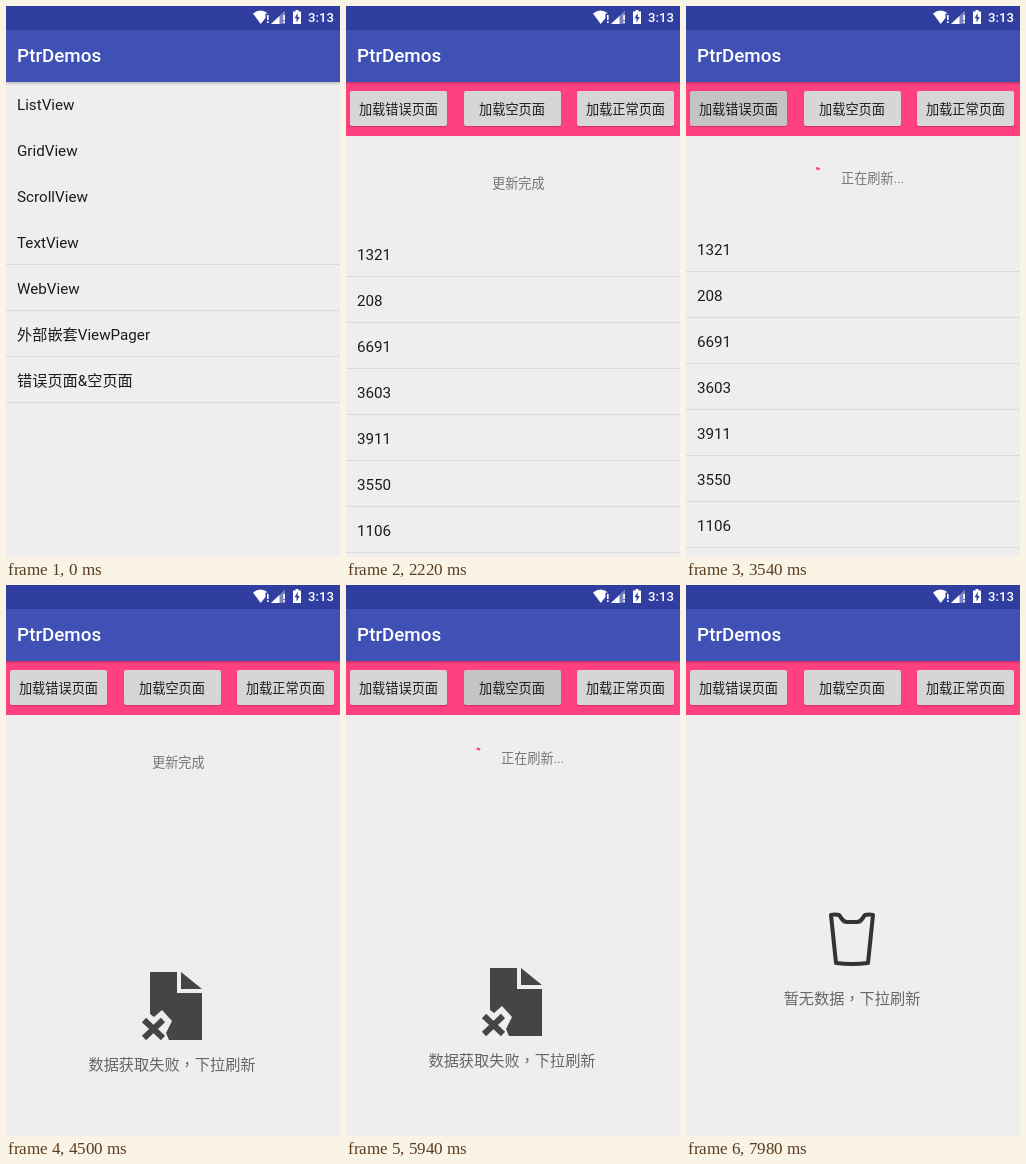
An HTML page that plays this animation: 334 px wide and 551 px high, repeating every 8 s.

```html
<!DOCTYPE html>
<html lang="zh-CN">
<head>
<meta charset="utf-8">
<title>PtrDemos</title>
<style>
  html, body { margin: 0; width: 100%; height: 100%; overflow: hidden; background: #eee; }
  body { font: 15.2px Roboto, "Noto Sans CJK SC", "Noto Sans CJK", sans-serif; color: #1c1c1c; white-space: nowrap; }
  #stage { position: relative; width: 334px; height: 551px; overflow: hidden; }
  #stage div, svg { position: absolute; box-sizing: border-box; }
  svg { overflow: visible; }
  .screen { left: 0; top: 0; width: 334px; height: 551px; background: #eee; isolation: isolate; }
  .status { width: 334px; height: 24px; background: #303f9f; }
  .toolbar { top: 24px; width: 334px; height: 52px; padding-left: 11px; background: #3f51b5; color: #fff;
    font-size: 18.8px; font-weight: 500; line-height: 52px; box-shadow: 0 1px 3px rgba(0,0,0,.3); z-index: 2; }
  .rows { width: 334px; }
  #stage .row { position: relative; height: 46px; padding-left: 11px; line-height: 48px; border-bottom: 1px solid #dadada; }
  #stage .faint { border-color: #ebebeb; }
  #press { left: 4px; top: 352px; width: 327px; height: 44px; background: rgba(0,0,0,.05); }
  #ripple { left: 97px; top: 6px; width: 128px; height: 38px; border-radius: 50%; background: rgba(0,0,0,.025); }
  #bar { top: 75px; width: 334px; height: 55px; background: #ff4081; }
  .button { top: 10px; width: 97px; height: 35px; border-radius: 2px; background: #d6d6d6;
    box-shadow: 0 1px 1px rgba(0,0,0,.2); font-size: 13.2px; line-height: 37px; text-align: center; }
  #view { top: 130px; width: 334px; height: 421px; overflow: hidden; }
  #content { width: 334px; height: 421px; }
  #label { top: -58px; font-size: 13.2px; line-height: 22px; color: #757575; }
  .page { width: 334px; height: 421px; }
  .message { top: 244px; width: 332px; line-height: 22px; text-align: center; color: #666;
    font-family: Roboto, "Noto Sans CJK TC", "Noto Sans CJK", sans-serif; }
</style>
</head>
<body>
<div id="stage">
  <div class="screen">
    <div class="status"></div>
    <div class="toolbar">PtrDemos</div>
    <div class="rows" id="menu" style="top:75px"></div>
    <div id="press"><div id="ripple"></div></div>
  </div>
  <div class="screen" id="demo">
    <div class="status"></div>
    <div class="toolbar">PtrDemos</div>
    <div id="bar">
      <div class="button" style="left:4px">加载错误页面</div>
      <div class="button" style="left:117.5px">加载空页面</div>
      <div class="button" style="left:231px">加载正常页面</div>
    </div>
    <div id="view">
      <div id="content">
        <svg id="spinner" width="1" height="1" style="left:128px;top:-47px">
          <path id="arc" fill="none" stroke="#ff4081" stroke-width="2.4"/>
        </svg>
        <div id="label"></div>
        <div class="page"><div class="rows" id="list"></div></div>
        <div class="page">
          <svg width="334" height="421" fill="#454545">
            <path d="M144 162h27v21h25v47h-33l-3-7 6-12-10-11-8 7-4-3zM175 162l21 17h-21z"/>
            <path d="M138 210l19 18m-19 0l19-18" stroke="#454545" stroke-width="6"/>
          </svg>
          <div class="message" lang="zh-TW">数据获取失败，下拉刷新</div>
        </div>
        <div class="page">
          <svg width="334" height="421">
            <path d="M145 171Q149 170 153 171C156 174 156 178 161 178H171C176 178 176 174 179 171Q183 170 187 171L182 219Q166 221 150 219Z"
              fill="none" stroke="#333" stroke-width="4" stroke-linejoin="round"/>
          </svg>
          <div class="message" lang="zh-TW">暂无数据，下拉刷新</div>
        </div>
      </div>
    </div>
  </div>
  <svg width="334" height="23" fill="#fff">
    <path d="M247 7.5Q254.5 1.5 262 7.5H259.5V12L254.7 18Z"/>
    <path d="M261 9h1.6v5h-1.6zm0 6.3h1.6v1.8h-1.6z"/>
    <path d="M279 4.5V18h-14z" opacity=".35"/>
    <path d="M273.5 10V18h-8.5zM277.3 9h1.6v5h-1.6zm0 6.3h1.6v1.8h-1.6z"/>
    <path d="M287 5.5h2.5V4h3v1.5h2.5V18h-8z"/>
    <path d="M291.7 7l-3.2 5.3h2V16.5l3.2-5.5h-2z" fill="#303f9f"/>
    <text x="302" y="16" font-size="13.2" font-weight="500">3:13</text>
  </svg>
</div>
<script>
const LOOP = 8000, STEP = 60, HEADER = 95;
const $ = id => document.getElementById(id);
const clamp = v => Math.min(1, Math.max(0, v));
const pages = [...document.querySelectorAll('.page')];
const buttons = [...document.querySelectorAll('.button')];

const fillRows = (id, items, faint = 0) => {
  $(id).innerHTML = items.map((text, i) =>
    `<div class="row${i < faint ? ' faint' : ''}">${text}</div>`).join('');
};
fillRows('menu', ['ListView', 'GridView', 'ScrollView', 'TextView', 'WebView', '外部嵌套ViewPager', '错误页面&amp;空页面'], 3);
fillRows('list', [1321, 208, 6691, 3603, 3911, 3550, 1106, 4827, 759, 2438]);

// Each refresh: scroll start, first visible moment, completion, scroll back.
const refreshes = [
  { open: 1240, show: 1240, done: 1980, close: 2709 },
  { open: 3322, show: 3420, done: 4260, close: 4945 },
  { open: 5704, show: 5760, done: 6600, close: 7302 },
  { open: 7924, show: 7924, done: Infinity, close: Infinity }
];
const fades = [1932, 4212, 6540];
const presses = [[3420, 3720], [5760, 6060]];

// Viscous scroll curve over 500 ms.
function viscous(ms) {
  const x = clamp(ms / 500) * 8;
  return x < 1 ? x - 1 + Math.exp(-x) : 1 - (1 - Math.exp(-1)) * Math.exp(1 - x);
}

function drawSpinner(ms) {
  $('spinner').style.display = ms >= 0 ? '' : 'none';
  if (ms < 0) return;
  const ease = p => p * p * (3 - 2 * p);
  const turn = ms * 720 / 6665 + ms * 90 / 1333;
  const tail = turn + 270 * ease(clamp(ms / 666 - 1));
  const head = Math.max(tail + 20, turn + 270 * ease(clamp(ms / 666)));
  const point = deg => {
    const a = deg * Math.PI / 180;
    return `${11 * Math.sin(a)} ${-11 * Math.cos(a)}`;
  };
  $('arc').setAttribute('d', `M${point(tail)}A11 11 0 ${+(head - tail > 180)} 1 ${point(head)}`);
}

function render(t) {
  $('press').style.display = t >= 720 && t < 1140 ? '' : 'none';
  $('ripple').style.display = t >= 900 ? '' : 'none';

  const enter = t - 1146;
  $('demo').style.opacity = 1 - (1 - clamp(enter / 200)) ** 4;
  $('demo').style.transform = `translateY(${Math.round(44 * (1 - clamp(enter / 350)) ** 5)}px)`;

  const r = refreshes.filter(r => t >= r.show).pop();
  const offset = r ? HEADER * (viscous(t - r.open) - viscous(t - r.close)) : 0;
  $('content').style.transform = `translateY(${Math.round(offset)}px)`;

  const done = r && t >= r.done;
  $('label').textContent = done ? '更新完成' : '正在刷新...';
  $('label').style.left = done ? '146px' : '155px';
  drawSpinner(r && !done ? t - r.open - 158 : -1);

  const shown = fades.map(start => clamp((t - start) / 240));
  pages.forEach((page, i) => page.style.opacity = shown[i] * (1 - (shown[i + 1] || 0)));

  presses.forEach(([from, to], i) => {
    buttons[i].style.background = t >= from && t < to ? '#c4c4c4' : '#d6d6d6';
  });
}

function tick() {
  const t = performance.now() % LOOP;
  render(Math.floor(t / STEP) * STEP);
  requestAnimationFrame(tick);
}
tick();
</script>
</body>
</html>
```
